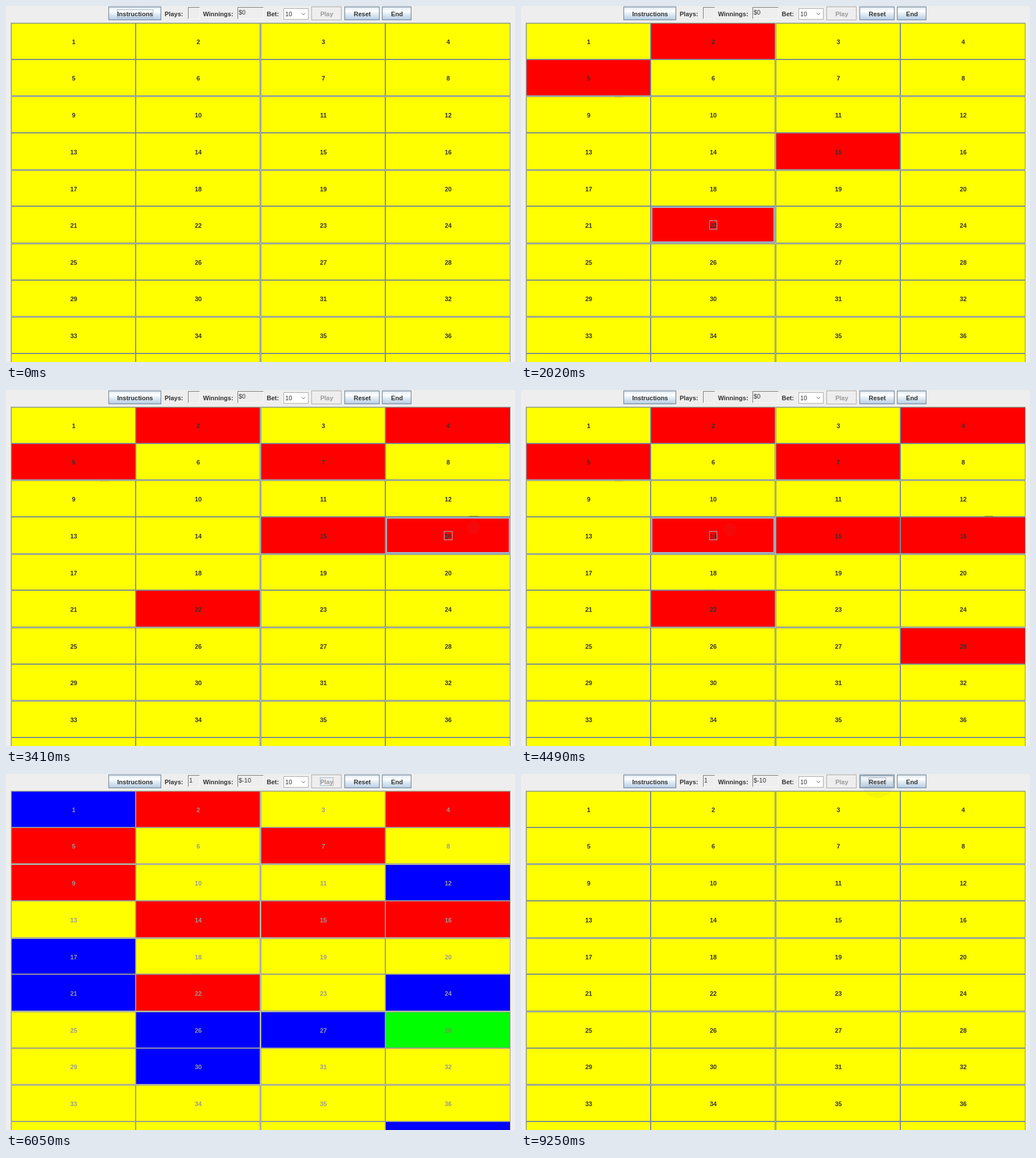
An HTML page that plays this animation: 895x626 px, repeating every 9.31 s.

```html
<!DOCTYPE html>
<html lang="en">
<head>
<meta charset="utf-8">
<title>Number board</title>
<style>
html, body { margin: 0; width: 100%; height: 100%; overflow: hidden; background: #eee; }
body { position: relative; font: bold 11px "Liberation Sans", Arial, sans-serif; color: #333; }
div { position: absolute; box-sizing: border-box; white-space: nowrap; }
#stage { left: 0; top: 0; width: 895px; height: 626px; overflow: hidden; background: #eee; }
#board { left: 8px; top: 29px; width: 879px; height: 597px; background: #c9cda8; }

.cell { display: flex; align-items: center; justify-content: center; padding: 2px 0 0 1px;
  background: #ff0; border: 1px solid #7a8a99; }
.cell span { position: relative; }
.cell.pick { background: #f00; }
.cell.draw { background: #00f; }
.cell.win { background: #0f0; }
.cell.off { color: #999; border-color: #999; }
.cell.win.off { color: #6a9a4a; }
.cell.focus { box-shadow: inset 0 0 0 2px #a3b8cc; }
.cell.focus span::after { content: ""; position: absolute; left: -1px; right: -1px; top: -3px; bottom: -1px;
  border: 1px solid #a3b8cc; }

.button { top: 1px; height: 24px; padding-left: 1px; line-height: 24px; text-align: center;
  border: 1px solid #7a8a99; box-shadow: inset 0 0 0 1px rgba(122, 138, 153, .25);
  background: linear-gradient(#dde8f3, #fff 30%, #dde8f3 60%, #b8cfe5); }
.button span { position: relative; }
.button.off { color: #999; background: #eee; border-color: #aaa; box-shadow: none; }
.button.hot { box-shadow: inset 0 0 0 2px #a3b8cc; }
.button.focus span::after { content: ""; position: absolute; left: -1px; right: -1px; top: -2px; bottom: -1px;
  border: 1px solid #a3b8cc; }
.label { top: 8px; line-height: 13px; }
.field { top: 2px; height: 21px; padding-left: 1px; line-height: 17px; font-weight: normal;
  border: 1px solid; border-color: #777 #f8f8f8 #f8f8f8 #777; }
.combo { left: 488px; top: 4px; width: 44px; height: 20px; padding-left: 2px; line-height: 19px;
  font-weight: normal; background: #fff; border: 1px solid #aaa; }
.combo svg { position: absolute; right: 4px; top: 7px; fill: none; stroke: #555; }
.mark { opacity: 0; }
#halo { border-radius: 50%; background: rgba(120, 120, 120, .07); border: 1px solid rgba(120, 120, 120, .04); }
</style>
</head>
<body>
<div id="stage"></div>
<script>
const LOOP = 9310;
const PLAY = 5760, PLAYED = 5830, RESET = 9170, CLEARED = 9250;
const READY = 4690;

// Clicks: time, number, pointer x, pointer y, delay until the ripple shows.
const clicks = [
  [70, 2, 370, 62], [730, 5, 172, 136], [1410, 15, 600, 256], [2020, 22, 332, 376],
  [2430, 7, 584, 102, 150], [2840, 4, 780, 62], [3200, 16, 822, 242],
  [3680, 28, 770, 450], [4280, 14, 368, 246], [READY, 9, 150, 200],
  [PLAY, 0, 563, 14], [RESET, 0, 627, 14]
].map(([time, number, x, y, delay = 70]) => ({ time, number, x, y, delay }));

const drawn = new Set([1, 12, 17, 21, 24, 26, 27, 28, 30, 40]);
const early = new Set([6, 9, 15, 19, 21, 25, 33, 34]);

const stage = document.getElementById('stage');

function add(parent, className, box, text) {
  const el = document.createElement('div');
  el.className = className;
  for (const key in box) el.style[key] = box[key] + 'px';
  if (text) {
    const span = document.createElement('span');
    span.textContent = text;
    el.append(span);
  }
  parent.append(el);
  return el;
}

function setClass(el, name) {
  if (el.className !== name) el.className = name;
}

function setText(el, text) {
  if (el.textContent !== text) el.textContent = text;
}

const button = (left, width, text) => add(stage, 'button', { left, width }, text);
const instructions = button(180, 93, 'Instructions');
const play = button(537, 53, 'Play');
const reset = button(595, 62, 'Reset');
button(661, 52, 'End');
add(stage, 'label', { left: 279 }, 'Plays:');
add(stage, 'label', { left: 346.5 }, 'Winnings:');
add(stage, 'label', { left: 458.5 }, 'Bet:');
const plays = add(stage, 'field', { left: 320, width: 21 });
const winnings = add(stage, 'field', { left: 407, width: 46 });
add(stage, 'combo', {}, '10').insertAdjacentHTML('beforeend',
  '<svg width="8" height="5"><path d="M1 .5 4 3.5 7 .5"/></svg>');

const board = add(stage, '', {});
board.id = 'board';

// Every second boundary leaves a light gap, one pixel wide, before the next cell.
function span(index, pitch) {
  const edge = i => Math.floor(pitch * i + .6);
  const start = edge(index) + (index % 2 ? 0 : 1);
  return [start, edge(index + 1) - start];
}

const cells = [];
for (let i = 0; i < 40; i++) {
  const [left, width] = span(i % 4, 219.6);
  const [top, height] = span(i >> 2, 64.67);
  cells.push(add(board, 'cell', { left, top, width, height }, String(i + 1)));
}

// Ripple edges left behind outside the clicked cells.
function mark(from, to, left, top, color, radius) {
  const el = add(stage, 'mark', { left, top, width: 17, height: 2 });
  el.style.background = color;
  el.style.borderRadius = radius;
  return { el, from, to };
}
const marks = [
  mark(800, PLAYED, 164, 159, 'rgba(150,110,0,.25)', '0 0 9px 9px'),
  mark(2090, LOOP, 324, 350, 'rgba(120,120,0,.08)', '9px 9px 0 0'),
  mark(3270, PLAYED, 814, 221, 'rgba(90,80,0,.4)', '9px 9px 0 0')
];

const halo = add(stage, '', {});
halo.id = 'halo';

function cellClass(number, t, last) {
  const isReset = t >= CLEARED || (t >= RESET && early.has(number));
  if (isReset) return 'cell';
  const picked = clicks.some(c => c.number === number && c.time <= t);
  const isPlayed = t >= PLAYED || (t >= PLAY && early.has(number));
  if (isPlayed) {
    const kind = drawn.has(number) ? (picked ? ' win' : ' draw') : (picked ? ' pick' : '');
    return 'cell off' + kind;
  }
  return 'cell' + (picked ? ' pick' : '') + (last && last.number === number ? ' focus' : '');
}

function drawHalo(t, last) {
  const age = last ? t - last.time - last.delay : -1;
  const gone = last && last.time === PLAY && t >= 6050;
  if (age < 0 || gone) {
    halo.style.display = 'none';
    return;
  }
  const r = age < 60 ? (last.number ? 26 : 28) : age < 120 ? 20 : 11;
  halo.style.display = 'block';
  halo.style.left = last.x - r + 'px';
  halo.style.top = last.y - r + 'px';
  halo.style.width = halo.style.height = 2 * r + 'px';
}

function render(t) {
  const last = clicks.filter(c => c.time <= t).pop();
  cells.forEach((el, i) => setClass(el, cellClass(i + 1, t, last)));

  const playOn = t >= READY && t < PLAY;
  const playFocus = t >= PLAY && t < CLEARED;
  setClass(instructions, 'button' + (last ? '' : ' focus'));
  setClass(play, 'button' + (playOn ? '' : ' off') + (playFocus ? ' focus' : ''));
  setClass(reset, 'button' + (t >= RESET ? ' hot' : '') + (t >= CLEARED ? ' focus' : ''));
  setText(plays, t >= PLAYED ? '1' : '');
  setText(winnings, t >= PLAYED ? '$-10' : '$0');

  for (const { el, from, to } of marks) el.style.opacity = t >= from && t < to ? 1 : 0;
  drawHalo(t, last);
}

const start = performance.now();
function frame() {
  render((performance.now() - start) % LOOP);
  requestAnimationFrame(frame);
}
frame();
</script>
</body>
</html>
```
